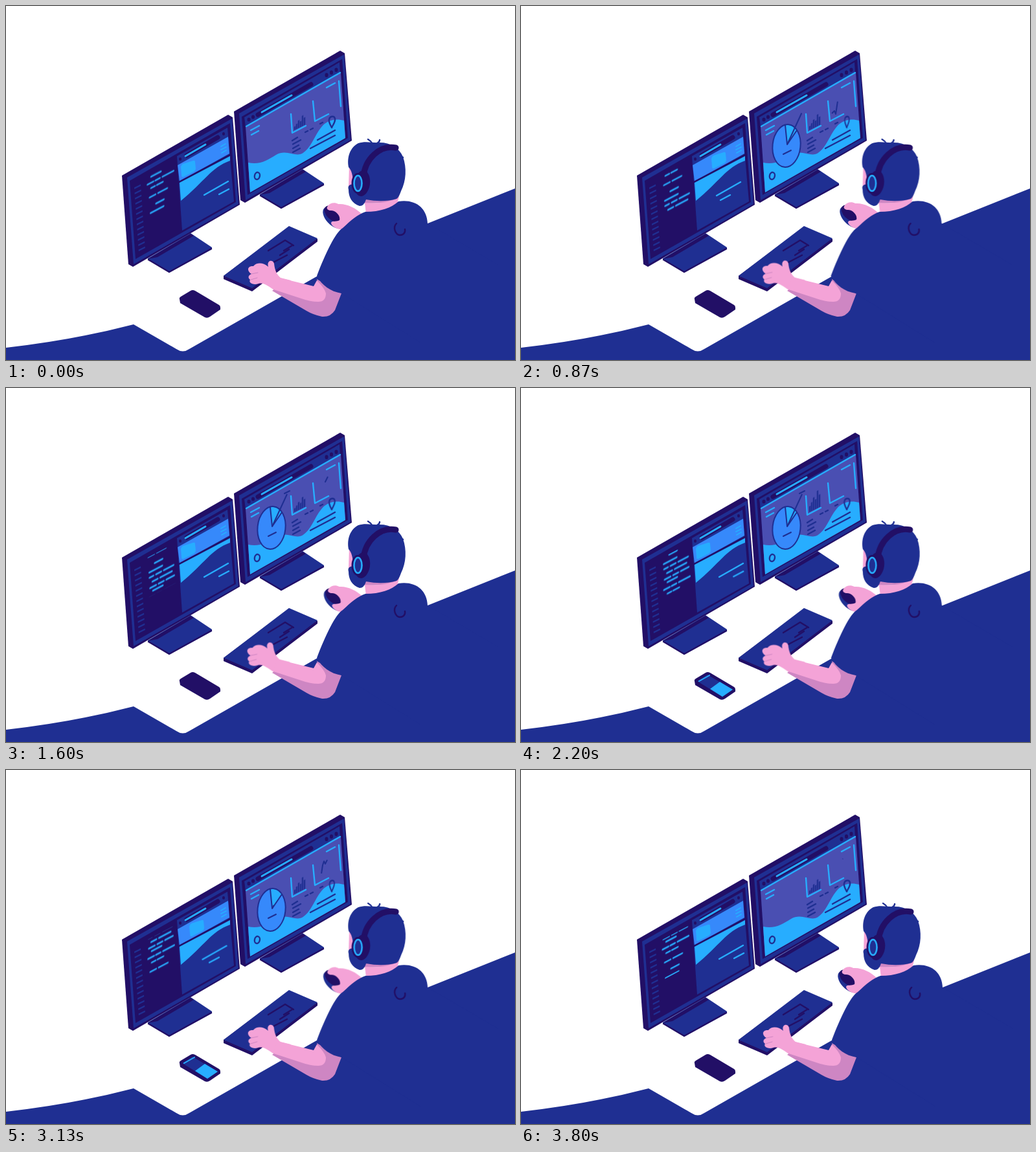
An HTML page without scripts for the animation above (3870 ms loop, 786 by 547 pixels).

```html
<!DOCTYPE html>
<html lang="en">
<head>
<meta charset="utf-8">
<title>Developer at a desk</title>
<style>
  html, body { margin: 0; width: 100%; height: 100%; overflow: hidden; background: #fff; }
  svg { display: block; width: 100vw; height: 100vh; }
  .navy { fill: #1f2f92; } .dark { fill: #220f66; } .cyan { fill: #27adff; }
  .blue { fill: #3689fb; } .haze { fill: #4a4fb2; }
  .pink { fill: #f4a3d7; } .rose { fill: #ce86c3; }
  .line { fill: none; stroke-width: 2.4; stroke-linecap: round; stroke-linejoin: round; }
  .sNavy { stroke: #1f2f92; } .sDark { stroke: #220f66; } .sCyan { stroke: #27adff; }

  .code, .pie, .hand, .label, .bars, .phone, .person, .mouse, .typing {
    animation: 3870ms linear infinite;
  }
  .card, .trend, .pin, .textA, .textB { animation: 1935ms ease-in-out infinite; }

  .code { animation-name: scroll; }
  @keyframes scroll { to { transform: translateY(-84px); } }

  .pie { animation-name: pie; transform-origin: 410px 216px; animation-timing-function: ease-out; }
  @keyframes pie {
    0%, 4% { transform: scale(0); }
    17%, 83% { transform: scale(1); }
    88% { transform: scale(.66); }
    93%, 100% { transform: scale(0); }
  }
  .hand { animation-name: hand; stroke-dasharray: 56 60; }
  @keyframes hand {
    0%, 14% { stroke-dashoffset: 56; visibility: hidden; }
    15% { visibility: visible; }
    22% { stroke-dashoffset: 3; }
    26%, 68% { stroke-dashoffset: 0; }
    72% { stroke-dashoffset: 6; }
    82% { stroke-dashoffset: 56; visibility: visible; }
    83%, 100% { stroke-dashoffset: 56; visibility: hidden; }
  }
  .label { animation-name: label; }
  @keyframes label { 0%, 25% { opacity: 0; } 28%, 67% { opacity: 1; } 70%, 100% { opacity: 0; } }

  .bars { animation-name: bars; animation-timing-function: ease-in-out; }
  @keyframes bars {
    0%, 100% { transform: scaleY(.9); }
    22% { transform: scaleY(1); }
    41% { transform: scaleY(.95); }
    57% { transform: scaleY(1.5); }
    72% { transform: scaleY(1.25); }
    88% { transform: scaleY(1); }
  }
  .trend { animation-name: trend; stroke-dasharray: 60 140; animation-timing-function: linear; }
  @keyframes trend {
    0%, 18% { stroke-dashoffset: 61; visibility: hidden; }
    19% { stroke-dashoffset: 60; visibility: visible; }
    45% { stroke-dashoffset: 0; }
    76% { stroke-dashoffset: -66; }
    83% { stroke-dashoffset: -82; }
    96% { stroke-dashoffset: -97; visibility: visible; }
    97%, 100% { stroke-dashoffset: -101; visibility: hidden; }
  }
  .pin { animation-name: pin; transform-origin: 503px 180px; }
  @keyframes pin { 0%, 100% { transform: scaleX(1); } 30% { transform: scaleX(.8); } 45% { transform: scaleX(.75); } }

  .card { animation-name: card; }
  @keyframes card { 0%, 18%, 75%, 100% { transform: none; } 38%, 50% { transform: translate(24px, -13px); } }
  .textA { animation-name: textA; }
  @keyframes textA { 0%, 18%, 78%, 100% { transform: none; } 38%, 50% { transform: translate(-4px, 1px); } }
  .textB { animation-name: textB; }
  @keyframes textB { 0%, 10%, 82%, 100% { transform: none; } 38%, 50% { transform: translate(-21px, 9px); } }

  .phone { animation-name: phone; }
  @keyframes phone { 0%, 49% { opacity: 0; } 53%, 91% { opacity: 1; } 95%, 100% { opacity: 0; } }

  .person { animation-name: sway; animation-timing-function: ease-in-out; }
  @keyframes sway {
    0%, 41%, 72%, 100% { transform: none; }
    22% { transform: translateX(-1.5px); }
    57% { transform: translateX(-1.2px); }
    88% { transform: translateX(.3px); }
  }
  .mouse { animation-name: mouse; animation-timing-function: ease-in-out; }
  @keyframes mouse {
    0%, 88%, 100% { transform: none; }
    22% { transform: translate(3px, -1px); }
    41%, 72% { transform: translate(1.5px, 1px); }
  }
  .typing { animation-name: typing; animation-duration: 645ms; animation-timing-function: ease-in-out; }
  @keyframes typing { 0%, 100% { transform: none; } 50% { transform: translate(-1.5px, -.6px); } }
</style>
</head>
<body>
<svg viewBox="0 0 786 547" preserveAspectRatio="none">
  <defs>
    <g id="monitor">
      <path class="navy" d="M219 390L285 351L318 373V376L252 412L219 392Z"/>
      <path class="line sDark" stroke-width="2" d="M220 392L252 411L317 375"/>
      <path class="dark" d="M219 391L285 352L290 355L234 388Z"/>
      <path class="dark" d="M179 262L343 168L350 172L361 307L196 403L189 399Z"/>
      <path class="navy" d="M187 265L349 174L359 306L197 399Z"/>
      <path class="dark" d="M191 270L346 181L355 303L200 391Z"/>
    </g>
    <g id="rows">
      <path d="M8 268h15M2 277h9M14 277h7M25 277h17M7 285h6M16 285h9M4 298h9M17 298h14M13 312h12
        M4 322h20M4 330h6M14 330h8M26 330h15M8 338h8M20 338h18M4 346h9M17 346h8M29 346h12"/>
    </g>
    <clipPath id="codeBox"><path d="M0 264H48V324H0Z"/></clipPath>
    <clipPath id="banner"><path d="M265 246L343 202L345 228L268 271Z"/></clipPath>
  </defs>

  <path class="navy" d="M0 528Q105 516 197 492L263 530Q273 537 283 530L425 449L520 395L651 336L786 282V547H0Z"/>

  <!-- right monitor -->
  <use href="#monitor" x="173" y="-99"/>
  <path class="navy" d="M368 172L515 87L516 103L370 187Z"/>
  <path class="haze" d="M370 187L517 103L524 204L377 288Z"/>
  <path class="cyan" d="M374 242C392 246 404 238 417 230C434 220 448 236 460 226C474 216 478 194 492 182C501 175 512 174 522 177L524 204L377 288Z"/>
  <path class="line sCyan" d="M371 186L516 103"/>
  <path class="line sDark" style="stroke-width:7" d="M389 168L471 121"/>
  <path class="line sCyan" style="stroke-width:3" d="M395 164L441 138"/>
  <g class="line sDark" style="stroke-width:5">
    <path d="M375 175v1M381.500 171v1M495 106v1.500M502.500 102v1.500M510 98v1.500"/>
  </g>
  <path class="line sCyan" d="M378 192L391 185M379 199L390 193M495 126L508 119M514 116L517 155"/>
  <path class="line sCyan" d="M440 167L442 196L463 185M474 147L477 178L498 167"/>
  <path class="line sNavy" d="M442 208L450 203M443 213.500L455 207M443 220L452 215M443 226L454 220M462 195L466 193M470 191L474 189M485 182L489 180"/>
  <path class="line sNavy" d="M481 207L508 192M470 220L508 200"/>
  <ellipse class="line sNavy" cx="388" cy="262.500" rx="4" ry="5.500" transform="rotate(12 388 262)"/>
  <path class="line sNavy pin" d="M503 188C500 182 498 179 499 175C500 170 507 169 508 174C509 179 505 183 503 188Z"/>
  <g transform="matrix(1 -.5 0 1 445 192)">
    <path class="line sNavy bars" style="stroke-width:2.300;stroke-linecap:butt" d="M1 0v-6M4 0v-9M7 0v-13M10 0v-10M13 0v-18M16 0v-13"/>
  </g>
  <path class="line sNavy trend" style="stroke-width:2;stroke-linecap:butt" pathLength="100" d="M480 166L484 162L486 167L489 147L491 141L493 145L497 137"/>
  <g class="pie">
    <ellipse class="blue" cx="410" cy="216" rx="21.500" ry="33" transform="rotate(6 410 216)"/>
    <path class="cyan" d="M408 184Q419 182 426 192L411 214Z"/>
    <path class="line sNavy" style="stroke-width:2" d="M408 184L411 214L426 192M405 229L417 223"/>
    <ellipse class="line sNavy" style="stroke-width:2" cx="410" cy="216" rx="21.500" ry="33" transform="rotate(6 410 216)"/>
  </g>
  <path class="line sNavy hand" style="stroke-width:2;stroke-linecap:butt" d="M411 214L434 164"/>
  <path class="line sNavy label" style="stroke-width:2" d="M430 163L438 159"/>

  <!-- left monitor -->
  <use href="#monitor"/>
  <path class="line sNavy" style="stroke-width:10;stroke-linecap:butt" stroke-dasharray="2.600 5.400" transform="matrix(1 -.5 .07 1 203 278)" d="M0 0V104"/>
  <g transform="matrix(1 -.53 .06 1 200 0)" clip-path="url(#codeBox)">
    <g class="code line sCyan" style="stroke-width:2.600">
      <use href="#rows"/>
      <use href="#rows" y="84"/>
    </g>
  </g>
  <path class="navy" d="M264 232L342 188L352 302L272 347Z"/>
  <path class="line sDark" style="stroke-width:7" d="M279 231L327 203"/>
  <path class="line sCyan" style="stroke-width:2.800" d="M277 232L308 214"/>
  <path class="line sDark" style="stroke-width:4" d="M269 236v1M336 197v1"/>
  <path class="blue" d="M265 246L343 202L345 228L268 271Z"/>
  <g clip-path="url(#banner)">
    <path class="cyan card" d="M270 249Q270 246 273 244L289 239Q292 238 292 241L293 251Q293 254 290 256L274 264Q271 265 271 261Z"/>
  </g>
  <path class="line sCyan" style="stroke-width:1.800" d="M332 217L339 213M332 222L340 218M333 227L340 223"/>
  <path class="cyan" d="M268 273L346 232V239C316 250 307 271 270 301Z"/>
  <path class="line sDark" d="M267 272L346 230"/>
  <path class="line sCyan textA" d="M306 292L343 271"/>
  <path class="line sCyan textB" d="M329 291L344 283"/>

  <!-- keyboard and phone -->
  <path class="dark" d="M336 417L437 341L481 360V364L380 441L336 422Z"/>
  <path class="navy" d="M336 417L437 340L481 359L380 436Z"/>
  <path class="line sDark" d="M405 378L431 362L444 370M429 378L442 370M423 385L437 376M413 396L434 385"/>
  <path class="dark" d="M268 453Q267 451 270 449L285 440Q288 438 292 440L329 462Q331 463 331 466V469L315 480Q311 483 307 481L269 459Z"/>
  <g class="phone">
    <path class="navy" d="M272 453L288 443L327 466L311 477Z"/>
    <path class="cyan" d="M292 465L307 454L327 466L311 477Z"/>
    <path class="line sCyan" style="stroke-width:2" d="M275 453L291 444"/>
  </g>

  <!-- mouse and right hand -->
  <g class="mouse">
    <ellipse class="navy" cx="505" cy="327" rx="20" ry="11" transform="rotate(48 505 327)"/>
    <ellipse class="dark" cx="504" cy="321" rx="15" ry="9" transform="rotate(45 504 321)"/>
    <path class="pink" d="M497 309C500 304 508 303 513 306C526 305 540 312 549 321L521 345C513 347 502 340 502 335C503 331 511 334 515 331C517 324 509 316 502 316C496 316 494 312 497 309Z"/>
  </g>

  <!-- typing arm -->
  <g class="typing">
    <path class="pink" d="M416 440C404 433 399 427 390 429C382 432 374 428 377 423C373 420 374 416 379 414C371 409 373 401 382 402C387 396 397 396 405 403C402 393 412 391 414 398C415 408 418 415 424 420L440 424L432 446Z"/>
    <path class="line rose" style="fill:none;stroke:#ce86c3;stroke-width:1" d="M379 414L389 412M378 423L388 420"/>
  </g>
  <path class="rose" d="M411 440L420 433L486 450L480 422L518 444L508 470Q501 481 488 480Q474 477 464 471Z"/>
  <path class="pink" d="M418 419L475 433L480 424Q492 436 494 444Q494 457 482 457Q470 457 456 452L413 438Z"/>

  <g class="person">
    <path class="rose" d="M554 290H608L604 304L553 305Z"/>
    <path class="pink" d="M554 304Q580 307 606 297L602 316L575 326L556 321Z"/>
    <path class="navy" d="M480 417C493 383 509 349 520 343C533 331 543 322 555 318C578 318 595 312 606 302C632 298 650 312 651 336L760 400V520H640L518 444C501 441 488 432 480 417Z"/>
    <path class="line sDark" d="M603 336C597 342 601 353 608 354C614 354 617 350 616 345"/>
    <path class="pink" d="M530 245L529 280L548 290L550 245Z"/>
    <path class="navy" d="M529 249C526 233 532 218 544 212C555 208 568 212 577 211C594 211 607 219 613 233C619 250 618 270 610 286Q607 295 603 298Q582 304 556 299Q553 309 546 309C534 305 529 295 529 284Q527 278 532 276L537 275C535 261 534 254 529 249Z"/>
    <path class="line sNavy" style="stroke-width:2.400" d="M566 213Q563 208 559 206M573 212Q577 210 577 207M607 232L613 234"/>
    <path class="line sDark" style="stroke-width:9" d="M552 264C554 237 577 214 602 219"/>
    <ellipse class="dark" cx="550" cy="274" rx="12" ry="20" transform="rotate(8 550 274)"/>
    <ellipse class="dark" cx="543" cy="274" rx="9.500" ry="16"/>
    <ellipse class="line sCyan" cx="543.500" cy="274" rx="6" ry="12" style="fill:#1f2f92;stroke-width:2.600"/>
  </g>
</svg>
</body>
</html>
```
